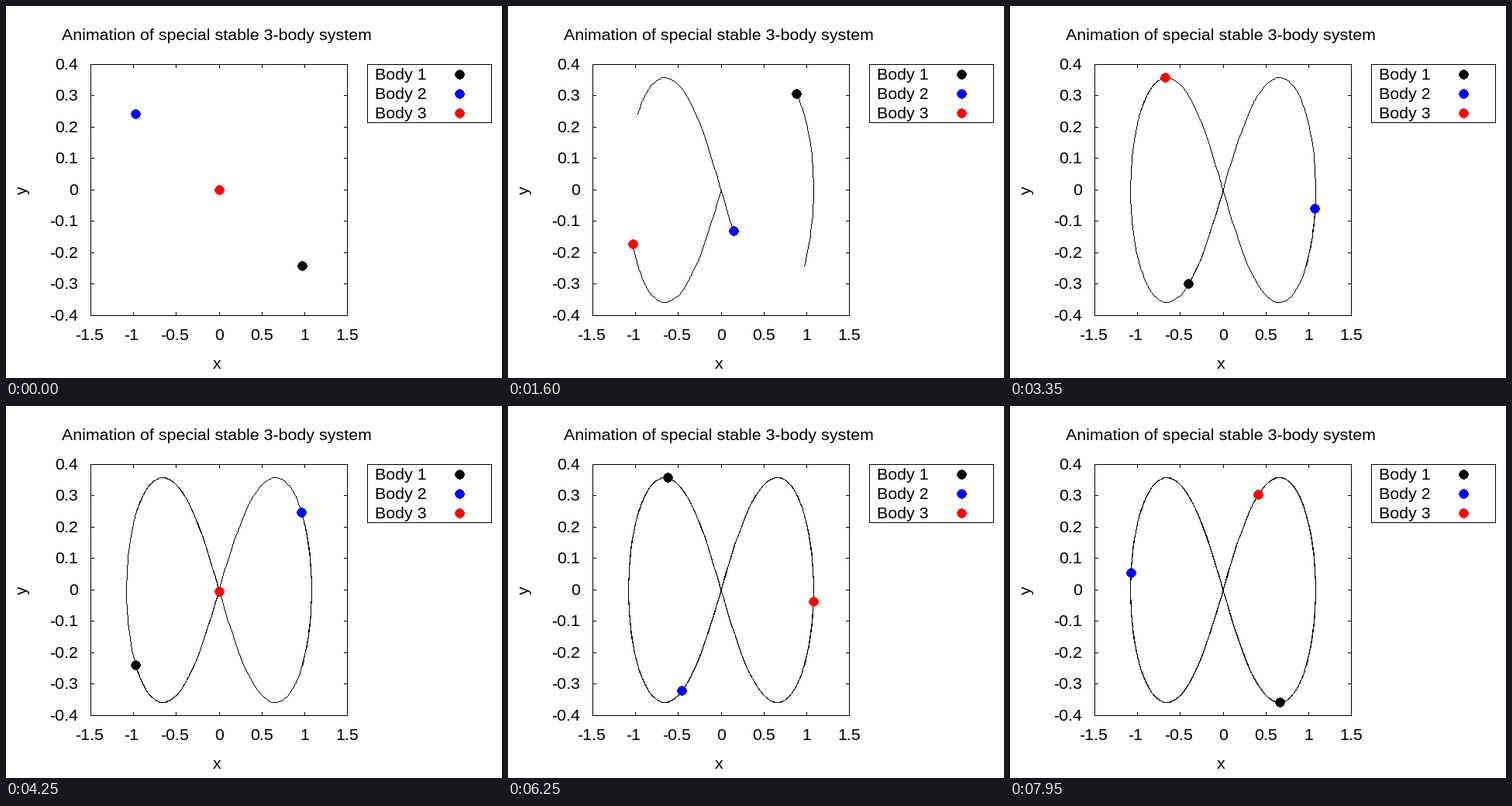
Recreate the animation shown at these times as a matplotlib script. Size 640 px wide and 480 px high, loop 8 s.

```python
import numpy as np
import matplotlib.pyplot as plt
from matplotlib.animation import FuncAnimation
from matplotlib.colors import to_rgb

W, H, DPI = 640, 480, 100
FRAMES, INTERVAL = 160, 50
PERIOD, STEPS = 6.32591398, 3000
FRAMES_PER_ORBIT = 169.7
SLOWDOWN = 0.75  # time steps shrink as bodies approach each other
LEFT, RIGHT, TOP, BOTTOM = 109, 440, 75, 399
RADIUS = 6
COLORS = ["#000000", "#0000ff", "#ff0000"]
FONT_PX = 16 * 96 / 72

plt.rcParams["font.family"] = "Liberation Sans"
plt.rcParams["font.size"] = FONT_PX * 72 / DPI
plt.rcParams["text.hinting"] = "native"


def accel(pos):
    """Gravity between equal unit masses, G = 1."""
    diff = pos[None, :, :] - pos[:, None, :]
    dist2 = (diff ** 2).sum(axis=2) + np.eye(len(pos))
    return (diff / dist2[..., None] ** 1.5).sum(axis=1)


def rate(state):
    return np.array([state[1], accel(state[0])])


def rk4(state, h):
    k1 = rate(state)
    k2 = rate(state + h / 2 * k1)
    k3 = rate(state + h / 2 * k2)
    k4 = rate(state + h * k3)
    return state + h / 6 * (k1 + 2 * k2 + 2 * k3 + k4)


def orbit():
    """One period of the figure-eight solution, finely sampled."""
    p = np.array([0.97000436, -0.24308753])
    v = np.array([-0.93240737, -0.86473146])
    state = np.array([[p, -p, 0 * p], [-v / 2, -v / 2, v]])
    path = [state[0]]
    for _ in range(STEPS):
        state = rk4(state, PERIOD / STEPS)
        path.append(state[0])
    return np.array(path)


def sample_frames(path):
    """Positions per frame, shape (frames, 3, 2), with adaptive steps."""
    gaps = np.linalg.norm(path - np.roll(path, 1, axis=1), axis=2)
    pace = gaps.min(axis=1) ** -SLOWDOWN
    clock = np.concatenate([[0], np.cumsum((pace[1:] + pace[:-1]) / 2)])
    clock *= FRAMES_PER_ORBIT / clock[-1]
    frames = np.arange(FRAMES)
    flat = path.reshape(len(path), -1)
    cols = [np.interp(frames, clock, c) for c in flat.T]
    return np.stack(cols, axis=1).reshape(FRAMES, 3, 2)


def to_px(x, y):
    right = np.floor((x + 1.5) / 3 * (RIGHT - LEFT) + 0.5)
    up = np.floor((y + 0.4) / 0.8 * (BOTTOM - TOP) + 0.5 + 1e-9)
    return (LEFT + right).astype(int), (BOTTOM - up).astype(int)


# For each pixel, the frame at which it turns black.
birth = np.full((H, W), FRAMES + 1)


def line(x0, y0, x1, y1, frame=0):
    n = max(abs(x1 - x0), abs(y1 - y0)) + 1
    xs = np.rint(np.linspace(x0, x1, n)).astype(int)
    ys = np.rint(np.linspace(y0, y1, n)).astype(int)
    birth[ys, xs] = np.minimum(birth[ys, xs], frame)


def box(x0, y0, x1, y1):
    for seg in ((x0, y0, x1, y0), (x0, y1, x1, y1),
                (x0, y0, x0, y1), (x1, y0, x1, y1)):
        line(*seg)


dy, dx = np.mgrid[-RADIUS:RADIUS + 1, -RADIUS:RADIUS + 1]
DISC = dx ** 2 + dy ** 2 <= RADIUS ** 2 + 1


def dot(img, x, y, color):
    img[y + dy[DISC], x + dx[DISC]] = to_rgb(color)


fig = plt.figure(figsize=(W / DPI, H / DPI), dpi=DPI, facecolor="white")
ax = fig.add_axes([0, 0, 1, 1])
ax.axis("off")


def label(x, y, text, ha="center"):
    ax.text(x, y, text, ha=ha, va="baseline", color="black")


# Plot frame, ticks and labels
box(LEFT, TOP, RIGHT, BOTTOM)
for v in np.linspace(-1.5, 1.5, 7):
    x, _ = to_px(v, 0)
    line(x, BOTTOM, x, BOTTOM - 4)
    line(x, TOP, x, TOP + 4)
    label(x + (-2 if v < 0 else 0.5), 431, f"{v:g}")
for i in range(-4, 5):
    _, y = to_px(0, i / 10)
    line(LEFT, y, LEFT + 4, y)
    line(RIGHT, y, RIGHT - 4, y)
    label(93, y + 7, f"{i / 10:g}", ha="right")
label(272, 44, "Animation of special stable 3-body system")
label(272, 468, "x")
ax.text(21.5, 238, "y", rotation=90, ha="center", va="center")

# Legend
box(466, 75, 626, 150)
for i in range(3):
    label(476, 95 + 25 * i, f"Body {i + 1}", ha="left")

# Trails
path = sample_frames(orbit())
px, py = to_px(path[..., 0], path[..., 1])
for f in range(1, FRAMES):
    for b in range(3):
        line(px[f - 1, b], py[f - 1, b], px[f, b], py[f, b], f)


def picture(f):
    img = np.repeat((birth > f)[..., None], 3, axis=2).astype(float)
    for b, color in enumerate(COLORS):
        dot(img, 585, 88 + 25 * b, color)
        dot(img, px[f, b], py[f, b], color)
    return img


canvas = ax.imshow(picture(0), aspect="auto", interpolation="nearest",
                   extent=(0, W, H, 0), zorder=0)
ax.set_xlim(0, W)
ax.set_ylim(H, 0)


def draw(f):
    canvas.set_data(picture(f))
    return [canvas]


anim = FuncAnimation(fig, draw, frames=FRAMES, interval=INTERVAL,
                     repeat=True, repeat_delay=0, blit=False)
plt.show()
```
